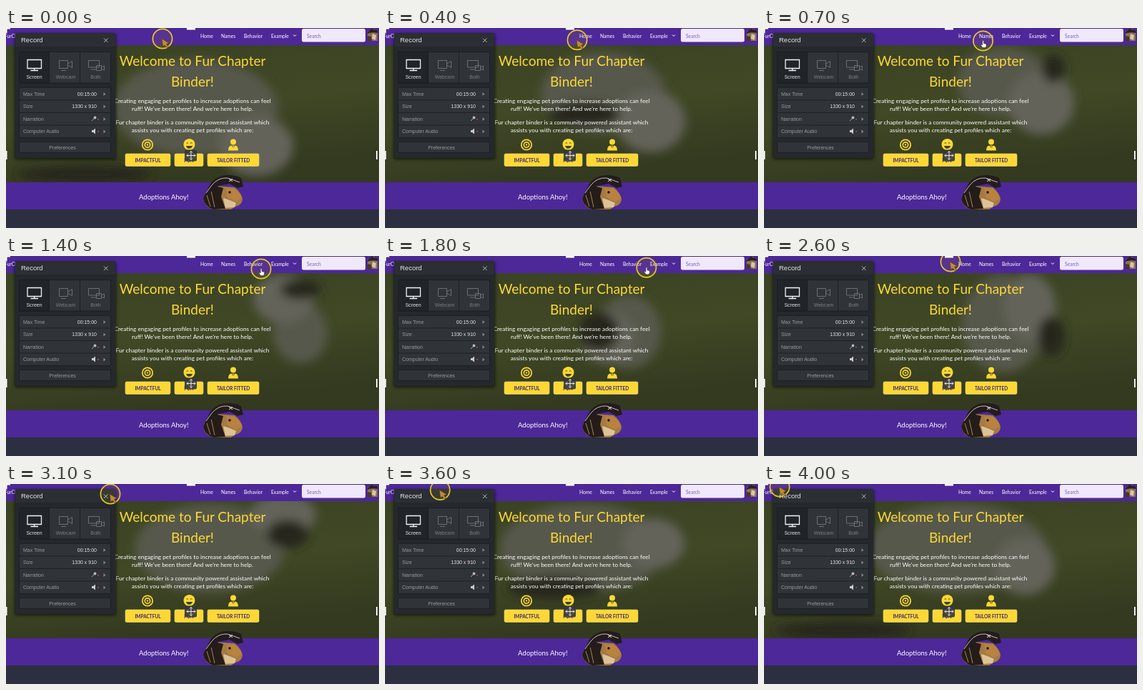
Write an HTML page that moves like this. It is 522 px wide and 280 px high and loops after 4.1 s.

```html
<!DOCTYPE html>
<html lang="en">
<head>
<meta charset="utf-8">
<style>
html, body { margin: 0; width: 522px; height: 280px; overflow: hidden; background: #2b2f3f; }
svg { display: block; font-family: Lato, sans-serif; }
text { dominant-baseline: central; fill: #fff; }
.mid { text-anchor: middle; }
.nav { font-size: 6.7px; }
.copy { font-size: 8.3px; text-anchor: middle; }
.title { font-size: 19px; fill: #fdd835; text-anchor: middle; }
.button rect { fill: #fdd835; stroke: #e9d98a; stroke-width: .6; }
.button text { fill: #3c267d; font-size: 6.5px; font-weight: 700; text-anchor: middle; }
.panel { font-family: "Liberation Sans", Arial, sans-serif; font-size: 7px; }
.panel text { fill: #999c9e; }
.panel .lit { fill: #e4e4e4; }
.panel .dim { fill: #7c7f82; }
.line { fill: none; stroke-width: 1; }
</style>
</head>
<body>
<svg width="522" height="280" viewBox="0 0 522 280">
  <defs>
    <filter id="soft" x="-50%" y="-50%" width="200%" height="200%"><feGaussianBlur stdDeviation="7"/></filter>
    <filter id="shadow"><feGaussianBlur stdDeviation="2"/></filter>
    <clipPath id="hero"><rect y="24" width="522" height="192"/></clipPath>
    <linearGradient id="grass" x2=".3" y2="1">
      <stop stop-color="#3a4225"/><stop offset=".55" stop-color="#404825"/><stop offset="1" stop-color="#343a20"/>
    </linearGradient>
  </defs>

  <g clip-path="url(#hero)">
    <rect y="24" width="522" height="192" fill="url(#grass)"/>
    <g id="dog" filter="url(#soft)">
      <ellipse fill="#57584b"/><ellipse fill="#64645a"/><ellipse fill="#25261e"/>
    </g>
  </g>
  <rect width="522" height="24" fill="#4d2898"/>
  <rect y="216" width="522" height="38" fill="#4d2898"/>
  <rect y="254" width="522" height="26" fill="#2b2f3f"/>

  <g class="nav">
    <text x="-2" y="10.5">FurCh</text>
    <text x="272" y="10.5">Home</text>
    <text x="301" y="10.5">Names</text>
    <text x="333" y="10.5">Behavior</text>
    <text x="371" y="10.5">Example</text>
    <path d="M402 9.5l2 2 2-2" class="line" stroke="#fff"/>
    <rect x="414" y="1" width="89" height="18.5" rx="2.5" fill="#f0e8fb"/>
    <text x="421" y="10.5" style="fill:#7a62ad">Search</text>
    <text id="submenu" x="374" y="33" style="font-size:6.2px">Submenu 1</text>
  </g>
  <g id="avatar">
    <path d="M506 5l9-4 5 5v12h-14z" fill="#8a7155"/>
    <path d="M506 6l6-5 8 3v3q-8-2-14 1z" fill="#2a2122"/>
    <path d="M513 8l5 2-1 7-5-2z" fill="#d8c6a5"/>
    <path d="M506 11l5 1 1 6h-6z" fill="#493629"/>
  </g>

  <text class="title" x="261" y="45">Welcome to Fur Chapter</text>
  <text class="title" x="261" y="74">Binder!</text>
  <text class="copy" x="261" y="101.5">Creating engaging pet profiles to increase adoptions can feel</text>
  <text class="copy" x="261" y="112.5">ruff! We've been there! And we're here to help.</text>
  <text class="copy" x="261" y="131.5">Fur chapter binder is a community powered assistant which</text>
  <text class="copy" x="261" y="142.5">assists you with creating pet profiles which are:</text>

  <g fill="none" stroke="#fdd835" stroke-width="1.7">
    <circle cx="198" cy="163.5" r="7.2"/><circle cx="198" cy="163.5" r="3.7"/>
    <circle cx="198" cy="163.5" r="1.2" fill="#fdd835" stroke="none"/>
  </g>
  <circle cx="256.5" cy="163" r="8" fill="#fdd835"/>
  <path d="M252 165h9q-1 3.800-4.500 3.800T252 165z" fill="#42431f"/>
  <path d="M252.500 161.500q1.300-2 2.600 0m2.800 0q1.300-2 2.600 0" class="line" stroke="#42431f"/>
  <g fill="#fdd835">
    <circle cx="318" cy="159.5" r="4"/>
    <path d="M311 171.500q0-7 5-7l2 6 2-6q5 0 5 7z"/>
    <path d="M317 164.500h2l-.5 2 .8 3.500-1.300 1.500-1.300-1.500.8-3.500z"/>
  </g>
  <g class="button">
    <rect x="167" y="176" width="63" height="17.500" rx="2"/><text x="198.500" y="185">IMPACTFUL</text>
    <rect x="236" y="176" width="40" height="17.500" rx="2"/><text x="256" y="185">FUN</text>
    <rect x="282" y="176" width="72" height="17.500" rx="2"/><text x="318" y="185">TAILOR FITTED</text>
  </g>

  <text x="186" y="236" font-size="9.5">Adoptions Ahoy!</text>
  <g id="guinea-pig">
    <path d="M276 239q4-14 16-18l28 2q10 8 11 17-1 8-10 10l-6 4h-25q-12-3-14-15z" fill="#a47a45"/>
    <path d="M276 239q4-14 16-18l12 3-3 12 6 17-17 1q-12-4-14-15z" fill="#241c19"/>
    <path d="M281 234l5 16M287 228l5 23" class="line" stroke="#a8834f"/>
    <path d="M308 224l12 1q9 6 10 14l-8 4-12-6z" fill="#b9823f"/>
    <path d="M304 238l9 3 9 4-2 6-13 1z" fill="#dcc397"/>
    <circle cx="313" cy="230" r="1.700" fill="#100c0b"/>
    <path d="M279 232l7-14q9-12 24-12 12 0 19 4l3 12-8 2-11-6-16 3-11 9z" fill="#221b20"/>
    <path d="M280 231l8-11q9-11 22-10l17 6" class="line" stroke="#cfbd97"/>
    <path d="M312 211l5 4m0-4l-5 4" class="line" stroke="#e9e3d6"/>
  </g>

  <rect x="250" y="170.500" width="17" height="16" rx="2" fill="#36383c" opacity=".92"/>
  <path d="M253 178.500h12M259 172.500v12M255 176.500l-2 2 2 2M263 176.500l2 2-2 2M257 174.500l2-2 2 2M257 182.500l2 2 2-2" class="line" stroke="#e8e8e8"/>
  <path d="M253 0h12v2.500h-12zM0 172h1.500v12H0zM518 172h1.800v12h-1.800zM0 0h6v1.500H1.500V7H0z" fill="#fff"/>

  <g class="panel">
    <rect x="12" y="8" width="142" height="176" rx="3" fill="#000" opacity=".6" filter="url(#shadow)"/>
    <rect x="13" y="7" width="140" height="175" rx="2" fill="#25282c"/>
    <rect x="13" y="7" width="140" height="19" rx="2" fill="#2b2e32"/>
    <text class="lit" x="21" y="16.500" font-size="9.500">Record</text>
    <path d="M137 14.500l5.500 5.500m0-5.500l-5.500 5.500" class="line" stroke="#b5b7b9"/>
    <g fill="#303337" stroke="#1b1d20" stroke-width=".8">
      <rect x="18.500" y="33.500" width="128" height="43.500" rx="2"/>
      <rect x="18.500" y="83.500" width="128" height="70" rx="2"/>
      <rect x="18.500" y="159.500" width="128" height="15" rx="2"/>
      <rect x="18.500" y="33.500" width="42" height="43.500" fill="#212428"/>
      <path d="M103.500 33.500V77M18.500 101h128M18.500 118.500h128M18.500 136h128"/>
    </g>
    <path d="M30 44.500h19.500v12H30zM39.700 56.500v3M34.500 59.500h10.500" class="line" stroke="#f4f4f4" style="stroke-width:1.300"/>
    <path d="M74.500 45.500h12v11h-12zM86.500 50l6-3.500v9l-6-3.500M77 59.500h7M115.500 45.500h15v9.500h-15zM119 58h7M126.500 52.500h7v7h-7zM133.500 55l4-2v6l-4-2" class="line" stroke="#6c6f72"/>
    <text class="lit mid" x="39.500" y="68">Screen</text>
    <text class="dim mid" x="83.500" y="68">Webcam</text>
    <text class="dim mid" x="125.500" y="68">Both</text>
    <text x="24" y="92">Max Time</text>
    <text x="24" y="109.500">Size</text>
    <text x="24" y="127">Narration</text>
    <text x="24" y="144.500">Computer Audio</text>
    <text class="lit" x="127" y="92" text-anchor="end">00:15:00</text>
    <text class="lit" x="127" y="109.500" text-anchor="end">1330 x 910</text>
    <path d="M136.500 90l3 2.500-3 2.500zM136.500 107.500l3 2.500-3 2.500zM136.500 125l3 2.500-3 2.500zM136.500 142.500l3 2.500-3 2.500z" fill="#85888b"/>
    <path d="M120 130l4-4" class="line" stroke="#aaa"/><circle cx="124.500" cy="125.500" r="1.900" fill="#bbb"/>
    <path d="M120 143h2l3-2.500v8l-3-2.500h-2z" fill="#ccc"/>
    <path d="M128 127h2v1.500h-2zM128 144h2v1.500h-2z" fill="#a94c60"/>
    <text class="mid" x="79" y="167">Preferences</text>
  </g>

  <g id="cursor">
    <circle r="13.600" fill="#e8d02a" fill-opacity=".08" stroke="#e6ca24" stroke-width="1.700"/>
    <path id="arrow" d="M-1 0l1.500 11 2.500-2 3.500 4 2-1.500-3-4 3.500-1.500z" fill="#c08a32" stroke="#5a3d20" stroke-width=".7"/>
    <path id="hand" d="M-.8 0q1-1 1.800 0v3.500l3.500 1v3L3 9.500h-3.500L-3 6l.7-1 1.500 1z" fill="#fff" stroke="#302345" stroke-width=".5"/>
  </g>
</svg>
<script>
const LOOP = 4100, STEP = 100;
const times = [0, 700, 1400, 2100, 2600, 3100, 4000];
const pointer = [[219, 15], [306.5, 18], [357, 18], [372.5, 15], [261, 8], [146, 14], [22, 4]];
// Each row holds cx, cy, rx, ry for body, head and dark patch.
const dogPoses = [
  [265, 112, 115, 68, 350, 165, 52, 42, 110, 205, 95, 12],
  [335, 75, 65, 48, 388, 105, 46, 44, 405, 57, 16, 20],
  [412, 108, 38, 42, 388, 60, 42, 34, 412, 47, 28, 14],
  [288, 105, 50, 58, 255, 155, 34, 38, 215, 150, 28, 38],
  [335, 95, 58, 68, 372, 72, 36, 46, 402, 112, 19, 28],
  [285, 90, 105, 62, 388, 43, 46, 28, 394, 70, 29, 20],
  [270, 90, 125, 62, 365, 115, 42, 40, 110, 205, 95, 12]
];
const $ = id => document.getElementById(id);
const blobs = [...$("dog").children];

function poseAt(rows, t) {
  const i = Math.max(0, times.findLastIndex(time => time <= t));
  const next = Math.min(i + 1, times.length - 1);
  const k = next === i ? 0 : (t - times[i]) / (times[next] - times[i]);
  return rows[i].map((v, n) => v + (rows[next][n] - v) * k);
}

function show(id, visible) {
  $(id).style.display = visible ? "" : "none";
}

function draw() {
  const t = Math.floor(performance.now() % LOOP / STEP) * STEP;
  const [x, y] = poseAt(pointer, t);
  const dog = poseAt(dogPoses, t);
  blobs.forEach((blob, i) => ["cx", "cy", "rx", "ry"].forEach((name, n) =>
    blob.setAttribute(name, dog[i * 4 + n])));
  const overLinks = x > 270 && x < 408;
  $("cursor").setAttribute("transform", `translate(${x} ${y})`);
  show("hand", overLinks);
  show("arrow", !overLinks);
  show("submenu", x > 367 && x < 408);
  requestAnimationFrame(draw);
}
draw();
</script>
</body>
</html>
```
